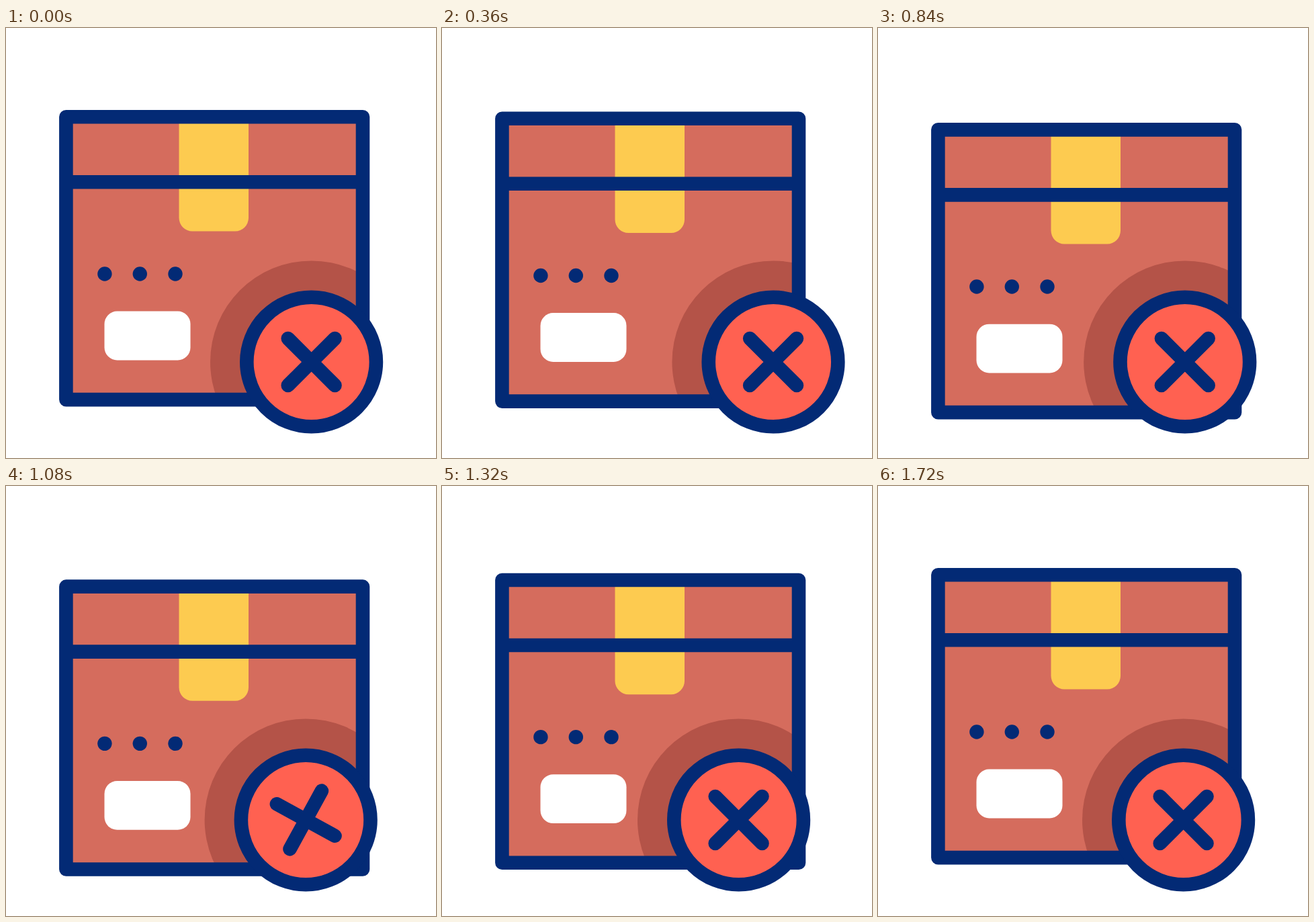
Write an HTML page that moves like this. It is 640 px wide and 640 px high and loops after 2 s.

```html
<!DOCTYPE html>
<html lang="en">
<head>
<meta charset="utf-8">
<title>Cancelled parcel</title>
<style>
  html, body { margin: 0; height: 100%; overflow: hidden; background: #fff; }
  svg { display: block; width: 100%; height: 100%; }
  .line { stroke: #032a75; stroke-width: 20.6; stroke-linecap: round; stroke-linejoin: round; }
</style>
</head>
<body>
<svg viewBox="0 0 640 640">
  <defs>
    <clipPath id="inside"><rect id="window" x="90" y="132" width="441" height="421"/></clipPath>
  </defs>
  <g class="box">
    <rect x="89.4" y="132.3" width="441.6" height="420.8" fill="#d56c5d"/>
    <path d="M257.5 132H361V282.5a20 20 0 0 1-20 20H277.5a20 20 0 0 1-20-20Z" fill="#fdcb50"/>
    <rect x="146.5" y="421.6" width="128" height="72.8" rx="19" fill="#fff"/>
    <g fill="#032a75">
      <circle cx="146.9" cy="366" r="10.7"/>
      <circle cx="199.3" cy="366" r="10.7"/>
      <circle cx="252" cy="366" r="10.7"/>
    </g>
  </g>
  <g clip-path="url(#inside)">
    <circle class="badge" cx="454.6" cy="497" r="150.6" fill="#b45348"/>
  </g>
  <path class="box line" d="M89.4 132.3H531V553.1H89.4ZM89.4 229.3H531" fill="none"/>
  <g class="badge">
    <circle class="line" cx="454.6" cy="497" r="96.3" fill="#ff6151"/>
    <path id="cross" class="line" d="M419.7 462.1l69.8 69.8M489.5 462.1l-69.8 69.8"/>
  </g>
</svg>
<script>
const LOOP = 2000, STEP = 40;
const drop = [[165, 0], [907, 19.3], [1650, 0]];
const shake = [[172, 0], [436, 45], [711, -45], [960, 43], [1193, -54], [1456, 34], [1690, 0]];
const turn = [[390, 0], [1290, 180]];

// cubic-bezier(k, 0, 1 - k, 1), solved by bisection
function ease(x, k) {
  let lo = 0, hi = 1, s = 0.5;
  for (let i = 0; i < 24; i++) {
    s = (lo + hi) / 2;
    const bx = 3 * k * s * (1 - s) ** 2 + 3 * (1 - k) * s * s * (1 - s) + s ** 3;
    if (bx < x) lo = s; else hi = s;
  }
  return s * s * (3 - 2 * s);
}

function valueAt(keys, t, k = 0.5) {
  if (t <= keys[0][0]) return keys[0][1];
  for (let i = 1; i < keys.length; i++) {
    const [t0, a] = keys[i - 1], [t1, b] = keys[i];
    if (t < t1) return a + (b - a) * ease((t - t0) / (t1 - t0), k);
  }
  return keys[keys.length - 1][1];
}

const setAll = (selector, transform) =>
  document.querySelectorAll(selector).forEach(el => el.setAttribute("transform", transform));

const start = performance.now();
function draw() {
  const elapsed = Math.max(0, performance.now() - start) % LOOP;
  const t = Math.floor(elapsed / STEP) * STEP;
  setAll(".box, #window", `translate(0 ${valueAt(drop, t, 0.46)})`);
  setAll(".badge", `translate(${valueAt(shake, t)} 0)`);
  setAll("#cross", `rotate(${valueAt(turn, t)} 454.6 497)`);
  requestAnimationFrame(draw);
}
draw();
</script>
</body>
</html>
```
